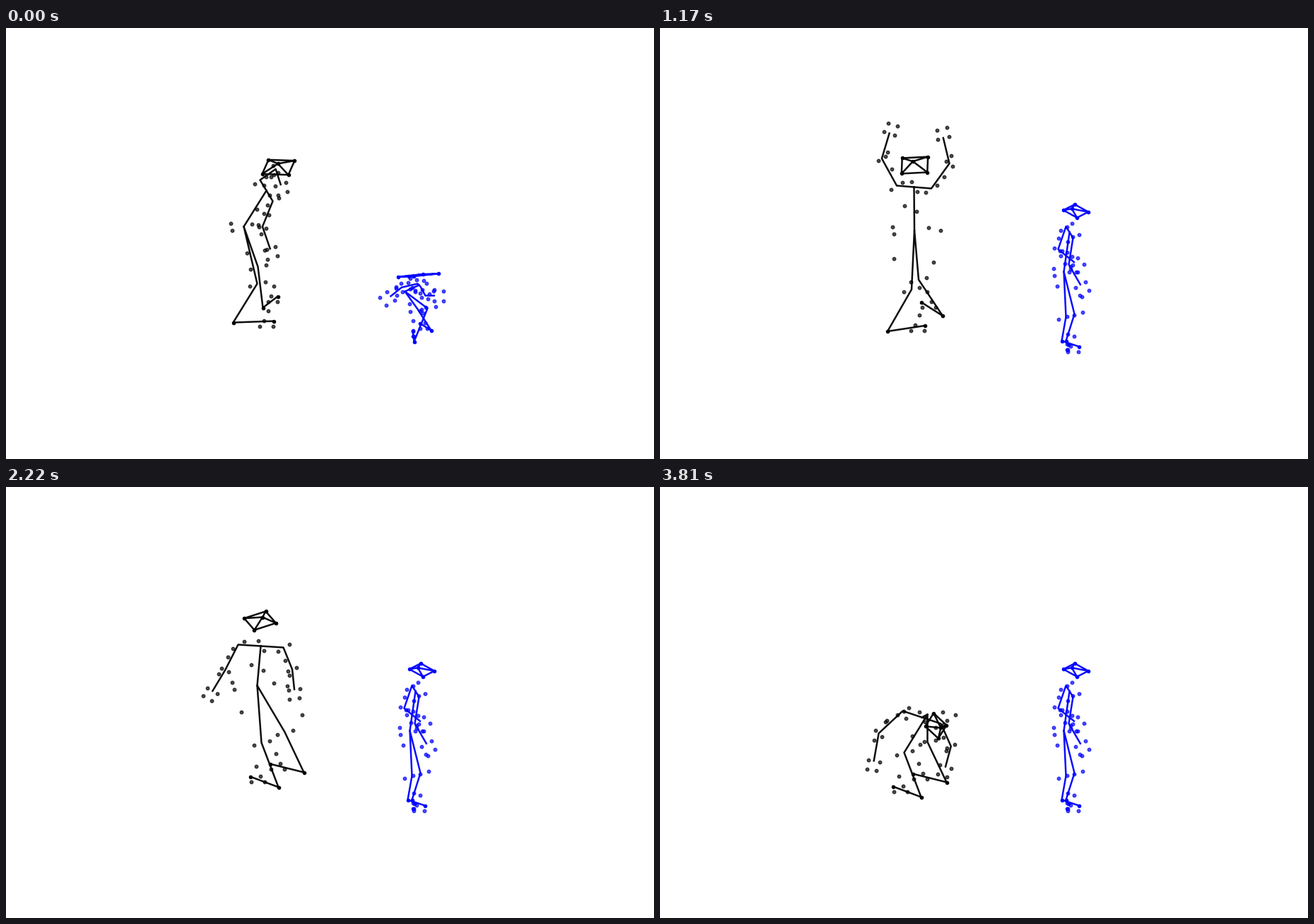
A matplotlib script that plays this animation: 917x611 px, repeating every 3.84 s.

```python
import numpy as np
import matplotlib.pyplot as plt
from matplotlib.animation import FuncAnimation

W, H, DPI = 917, 611, 64
PT = 72 / DPI
FRAMES, STEP = 128, 30
RISE = 19  # frames the blue dancer needs to stand up
UPPER = .54  # upper arm's part of the reach
HEAD_SIDE = 22

# Joint order: head 0-4, neck 5, pelvis 6, arms 7-12, legs 13-18.
PATHS = [[0, 1, 2, 3, 0], [0, 4, 2], [1, 4, 3], [9, 8, 7, 5, 10, 11, 12],
         [5, 6], [15, 14, 13, 6, 16, 17, 18]]
KNOBS = [0, 1, 2, 3, 4, 14, 15, 17, 18]

# Neck, half shoulder line, pelvis, head centre (x, y each);
# then the head's brow angle, side angle, width and crown shift.
BODY = {
    0: [368, 230, 9, 15, 336, 281, 385, 197, 2, 114, 37, -.08],
    26: [345, 233, 29, -4, 364, 298, 335, 200, -5, 98, 36, -.14],
    52: [373, 217, 20, 8, 355, 275, 385, 188, -1, 85, 37, .03],
    74: [360, 225, 32, 2, 355, 281, 359, 189, -18, 49, 32, .2],
    90: [355, 228, 15, -16, 374, 275, 336, 218, 0, 83, 31, .3],
    108: [328, 309, -12, -13, 421, 292, 300, 333, 15, 90, 28, -.5],
    127: [370, 326, 27, 9, 378, 322, 390, 338, 43, 122, 25, .3],
}
# Upper arm angle, forearm angle and reach, left then right.
ARMS = {
    0: [-35, 72, 50, 112, 71, 72],
    9: [167, 171, 100, 80, 50, 70],
    26: [59, -53, 72, 18, 17, 63],
    38: [242, -70, 80, -55, -105, 80],
    52: [187, -163, 120, -3, -2, 91],
    54: [187, -163, 138, -3, -2, 103],
    74: [117, -239, 75, 68, 84, 62],
    90: [82, -237, 87, 50, 105, 63],
    108: [53, -246, 90, 13, 43, 59],
    127: [137, -260, 86, 66, 105, 65],
}
# Stances: knee, heel, toe of each leg.
STEP_OUT = [355, 362, 321, 417, 378, 415, 356, 338, 363, 396, 384, 380]
FACE_RIGHT = [353, 365, 319, 425, 371, 416, 363, 351, 397, 403, 368, 384]
FACE_LEFT = [363, 363, 387, 426, 347, 411, 396, 348, 423, 405, 375, 393]
CROUCH = [582, 398, 601, 428, 585, 418, 596, 397, 577, 444, 575, 429]
UPRIGHT = [574, 409, 568, 443, 592, 451, 586, 405, 574, 443, 577, 448]


def shifted(stance, dx, dy):
    return (np.reshape(stance, (-1, 2)) + (dx, dy)).ravel()


LEGS = {0: STEP_OUT, 26: shifted(FACE_RIGHT, 5, 9), 52: FACE_RIGHT,
        74: shifted(FACE_LEFT, -2, -1), 90: FACE_LEFT,
        108: shifted(FACE_LEFT, 10, 0), 127: shifted(FACE_LEFT, -18, 13)}


def rise(low, high):
    return {0: low, RISE: high, FRAMES: high}


BLUE = [rise([584, 364, 2, 2, 564, 373, 583, 350, -6, -2, 36, -.3],
             [579, 289, 5, 8, 571, 345, 588, 259, -27, 29, 18, 0]),
        rise([167, 141, 43, 62, 0, 27], [109, 39, 63, 99, 60, 71]),
        rise(CROUCH, UPRIGHT)]

# Markers near a joint: joint, dx, dy.
CHEST = [(5, -4, -8), (5, 4, 6), (5, -14, 26), (5, 3, 34)]
# These close up as the body turns sideways.
HIPS = [(6, -36, -5), (6, -33, 5), (6, 23, -4), (6, 42, 0),
        (13, -29, -44), (16, 24, -25)]
# Markers at a toe, mirrored with the foot.
FOOT = [(1, 7), (8, -15), (14, -1), (20, 7)]
# Markers along an arm: segment, part of its length, px further, px aside.
ARM = [(0, .55, 0, 5), (0, 1, 0, 6), (0, 1, 0, -6), (1, .28, 0, 5),
       (1, 1, 0, 8), (1, 1, 0, -8), (1, 1, 13, 8), (1, 1, 13, -6)]


def track(keys):
    """Smooth curve through key values that never swings past them."""
    t = np.array(list(keys), float)
    p = np.array(list(keys.values()), float)
    rate = np.diff(p, axis=0) / np.diff(t)[:, None]
    a, b = rate[:-1], rate[1:]
    same = a * b > 0
    mid = np.where(same, 2 * a * b / np.where(same, a + b, 1), 0)
    slope = np.vstack([rate[:1], mid, rate[-1:]])

    def at(f):
        i = min(np.searchsorted(t, f, side="right") - 1, len(t) - 2)
        h = t[i + 1] - t[i]
        s = (f - t[i]) / h
        ease = s * s * (3 - 2 * s)
        return (p[i] + (p[i + 1] - p[i]) * ease
                + h * s * (1 - s) * ((1 - s) * slope[i] - s * slope[i + 1]))
    return at


def polar(angle, length):
    a = np.radians(angle)
    return length * np.array([np.cos(a), np.sin(a)])


def skeleton(body, arms, legs):
    neck, half, pelvis, centre = body[:8].reshape(4, 2)
    brow_angle, side_angle, width, crown = body[8:]
    brow, side = polar(brow_angle, width), polar(side_angle, HEAD_SIDE)
    joints = [centre + (x * brow + y * side) / 2
              for x, y in [(-1, -1), (1, -1), (1, 1), (-1, 1)]]
    joints += [centre + crown * brow - .3 * (1 - 2 * abs(crown)) * side,
               neck, pelvis]
    for sign, (upper, fore, reach) in zip((-1, 1), arms.reshape(2, 3)):
        shoulder = neck + sign * half
        elbow = shoulder + polar(upper, reach * UPPER)
        joints += [shoulder, elbow, elbow + polar(fore, reach * (1 - UPPER))]
    return np.vstack([joints, legs.reshape(6, 2)])


def markers(j):
    width = .3 + .7 * min(1, abs(j[10, 0] - j[7, 0]) / 60)
    dots = [j[k] + (dx, dy) for k, dx, dy in CHEST]
    dots += [j[k] + (dx * width, dy) for k, dx, dy in HIPS]
    for sign in (-1, 1):
        dots += [j[k] + (sign * 8, -sign * 5) for k in (7, 10)]
        dots += [j[k] + (sign * 11, -sign * 3) for k in (13, 16)]
    for heel, toe in ((14, 15), (17, 18)):
        side = np.clip((j[heel, 0] - j[toe, 0]) / 30, -1, 1)
        dots += [j[toe] + (dx * side, dy) for dx, dy in FOOT]
    for first in (7, 10):
        for seg, part, ahead, aside in ARM:
            a, b = j[first + seg], j[first + seg + 1]
            u = (b - a) / max(np.hypot(*(b - a)), 1)
            dots.append(a + (b - a) * part + u * ahead
                        + np.array([-u[1], u[0]]) * aside)
    return np.array(dots)


fig = plt.figure(figsize=(W / DPI, H / DPI), dpi=DPI, facecolor="white")
ax = fig.add_axes([0, 0, 1, 1])
ax.set(xlim=(-.5, W - .5), ylim=(H - .5, -.5))
ax.axis("off")


class Dancer:
    def __init__(self, color, *parts):
        self.tracks = [track(keys) for keys in parts]
        self.bones, = ax.plot([], [], color=color, lw=2.5 * PT, alpha=.95,
                              solid_joinstyle="round", zorder=2)
        self.knobs, = ax.plot([], [], "o", color=color, ms=5.6 * PT,
                              mew=0, zorder=3)
        self.dots = ax.scatter([], [], s=(4.6 * PT) ** 2, color=color,
                               linewidths=1.3 * PT, alpha=.7, zorder=1)

    def pose(self, f):
        joints = skeleton(*[at(f) for at in self.tracks])
        gap = [[np.nan, np.nan]]
        line = np.vstack([np.vstack([joints[p], gap]) for p in PATHS])
        self.bones.set_data(*line.T)
        self.knobs.set_data(*joints[KNOBS].T)
        self.dots.set_offsets(markers(joints))
        return self.bones, self.knobs, self.dots


dancers = [Dancer("black", BODY, ARMS, LEGS), Dancer("blue", *BLUE)]


def draw(f):
    return [artist for d in dancers for artist in d.pose(f)]


anim = FuncAnimation(fig, draw, frames=FRAMES, interval=STEP,
                     repeat=True, repeat_delay=0, blit=False)
plt.show()
```
